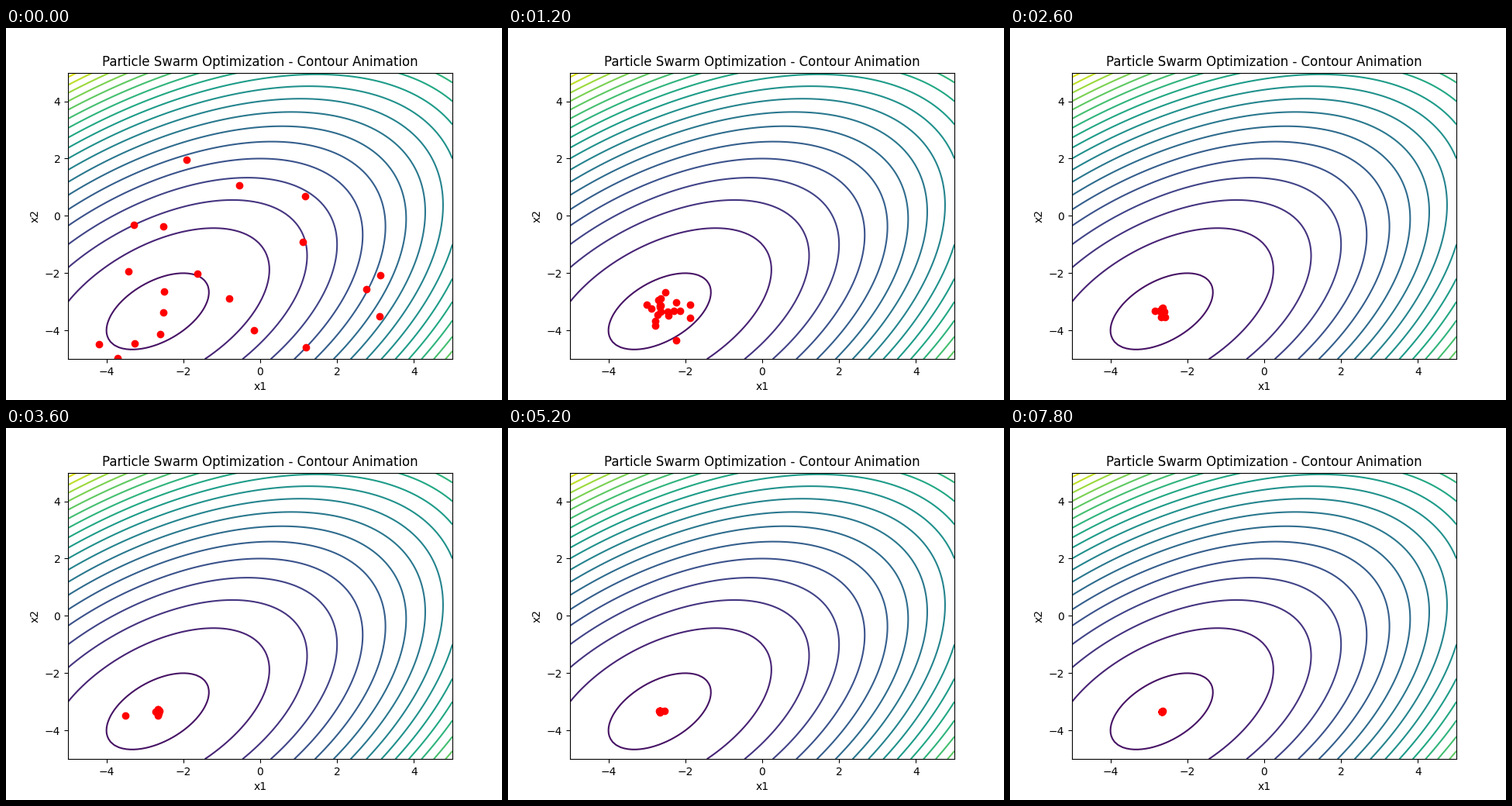
A matplotlib script for the animation above (8 s loop, 640 px wide and 480 px high).

```python
import numpy as np
import matplotlib.pyplot as plt
from matplotlib.animation import FuncAnimation

FRAMES, STEP = 40, 200
GOAL = np.array([-8 / 3, -10 / 3])     # minimum of the bowl
DAMPING = np.array([0.77, 0.82])       # per frame, along x1 and x2
KICK = 13                              # frame at which one particle strays

START = np.array([
    (-1.91, 1.96), (-0.54, 1.07), (1.17, 0.69), (-3.29, -0.31),
    (-2.52, -0.37), (1.11, -0.91), (-3.43, -1.94), (-1.63, -2.02),
    (-2.50, -2.64), (-0.81, -2.88), (-2.52, -3.37), (-2.60, -4.13),
    (-3.27, -4.45), (-4.19, -4.48), (-3.71, -4.97), (-0.16, -3.99),
    (1.19, -4.59), (2.76, -2.56), (3.13, -2.07), (3.11, -3.51)])

# Each particle swings about the goal at its own pace
rate = np.random.default_rng(4).uniform(0.6, 1.1, START.shape)


def bowl(x1, x2):
    return x1**2 - x1 * x2 + x2**2 + 2 * x1 + 4 * x2 + 3


def swarm(n):
    pos = GOAL + (START - GOAL) * DAMPING**n * np.cos(rate * n)
    t = max(n - KICK, 0)
    swing = -2.18 * 0.86**t * np.sin(2 * np.pi * t / 14)
    pos[-1] += swing, 0.17 * swing
    return pos


fig, ax = plt.subplots(figsize=(6.4, 4.8), dpi=100)
axis = np.linspace(-5, 5, 100)
X1, X2 = np.meshgrid(axis, axis)
ax.contour(X1, X2, bowl(X1, X2), 20, cmap="viridis")
ax.set(xlim=(-5, 5), ylim=(-5, 5), xlabel="x1", ylabel="x2",
       title="Particle Swarm Optimization - Contour Animation")
dots, = ax.plot([], [], "ro")


def draw(n):
    dots.set_data(*swarm(n).T)
    return dots,


anim = FuncAnimation(fig, draw, frames=FRAMES, interval=STEP, repeat=True,
                     repeat_delay=0)
plt.show()
```
